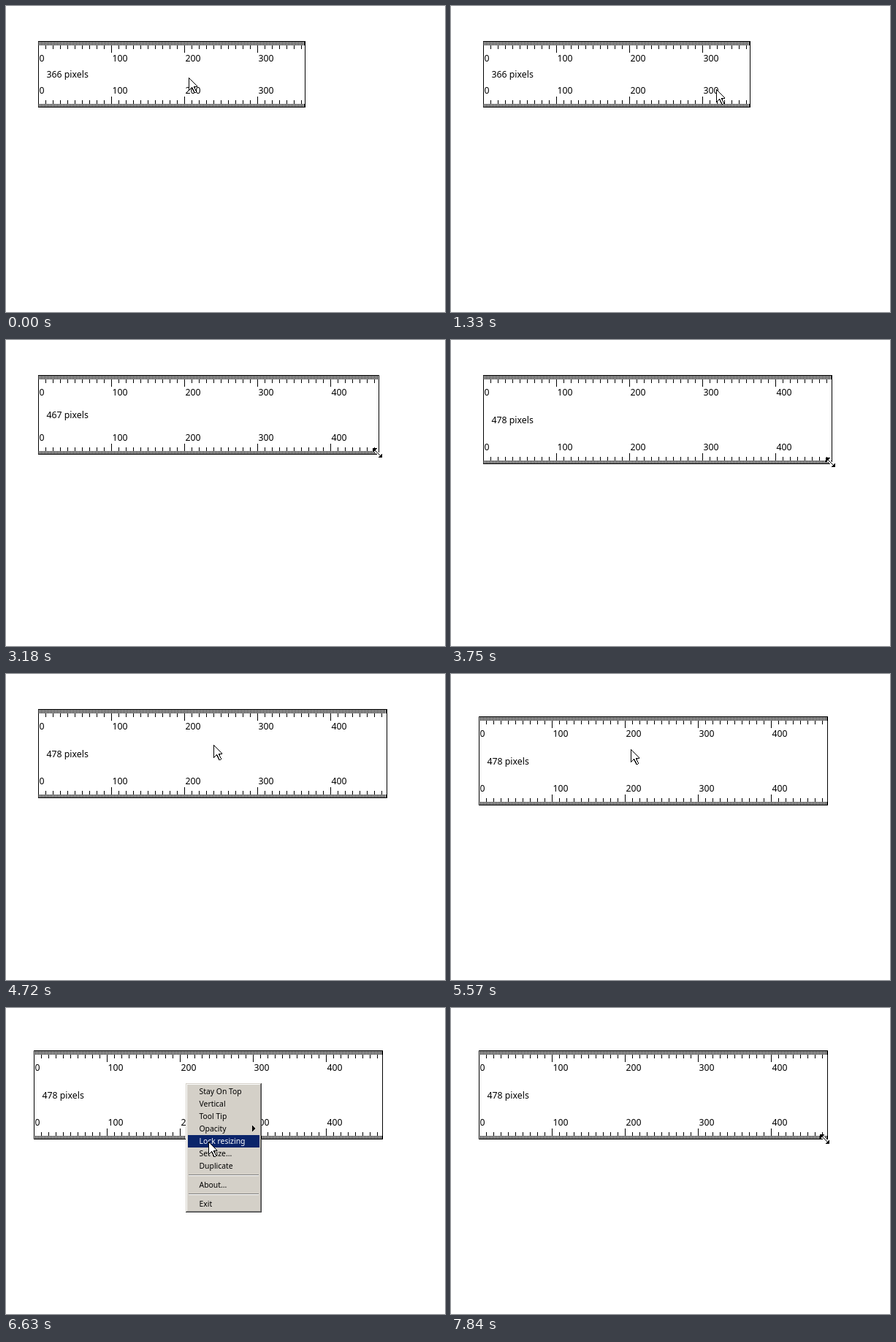
Animation of 601 by 419 pixels, one loop 7.99 s. Source, as an HTML page:

```html
<!DOCTYPE html>
<html lang="en">
<head>
<meta charset="utf-8">
<title>Pixel ruler</title>
<style>
html, body { margin: 0; width: 100%; height: 100%; overflow: hidden; background: #fff; }
#stage { display: block; width: 601px; height: 419px; }
text { font-family: "Noto Sans", "Open Sans", sans-serif; white-space: pre; }
#ruler text { font-size: 12.3px; }
#menu text { font-size: 10.4px; }
path, rect { shape-rendering: crispEdges; }
</style>
</head>
<body>
<svg id="stage" viewBox="0 0 601 419">
  <rect width="601" height="419" fill="#fff"/>
  <svg id="ruler"></svg>
  <g id="menu"></g>
  <g id="cursor">
    <path id="arrow" transform="translate(.5 .5)" fill="#fff" stroke="#000"
      d="M0 0V17L4 13 7.5 20H9L10 18.5 7 12H11V11Z"/>
    <g id="resize">
      <path d="M-4 -4L5 5" stroke="#fff" stroke-width="3"/>
      <path d="M-4 -4L5 5" stroke="#000"/>
      <path d="M-6 -6H0L-6 0ZM7 7V1L1 7Z"/>
    </g>
  </g>
</svg>
<script>
const LOOP = 7990;
const ITEM_H = 17, MENU_X = 246, MENU_Y = 103, MENU_W = 104, MENU_H = 177;
const ITEMS = ["Stay On Top", "Vertical", "Tool Tip", "Opacity", "Lock resizing",
  "Set size...", "Duplicate", "-", "About...", "-", "Exit"];
const $ = id => document.getElementById(id);

// Timeline: every step is a full state that holds until the next one.
const steps = [{ t: 0, x: 250, y: 98, resize: false, rx: 44, ry: 48, w: 366, h: 91, menu: false }];
const last = () => steps[steps.length - 1];
const add = (t, change) => steps.push({ ...last(), t, ...change });

function move(t0, t1, n, x, y, { bend = 0, drag = false, ease = u => u } = {}) {
  const a = last();
  for (let k = 1; k <= n; k++) {
    const u = ease(k / n);
    const dx = Math.round((x - a.x) * u);
    const dy = Math.round((y - a.y) * u + bend * 4 * u * (1 - u));
    add(t0 + (n > 1 ? (t1 - t0) * (k - 1) / (n - 1) : 0), {
      x: a.x + dx, y: a.y + dy, resize: false,
      ...(drag && { rx: a.rx + dx, ry: a.ry + dy })
    });
  }
}

function size(t, w, h) {
  const { rx, ry } = last();
  add(t, { w, h, x: rx + w - 3, y: ry + h - 3, resize: true });
}

const smooth = u => u * u * (3 - 2 * u);

move(150, 460, 3, 235, 85);
move(760, 760, 1, 230, 84);
move(897, 1583, 6, 410, 124, { ease: smooth });
add(1720, { x: 406, y: 132, resize: true });
add(2120, { x: 407, y: 138 });
[[381, 118], [398, 130], [418, 133], [437, 127], [453, 116], [467, 109], [475, 112]]
  .forEach(([w, h], i) => size(2430 + i * 150 + (i > 5 ? 10 : 0), w, h));
size(3490, 478, 118);
size(3626, 478, 122);
move(3762, 3762, 1, 518, 155);
move(3897, 4440, 5, 376, 117);
move(4570, 4720, 2, 284, 97);
move(4990, 5110, 2, 278, 107, { drag: true });
move(5420, 5570, 2, 246, 103);
add(5880, { menu: true });
move(6030, 6630, 5, 277, 183);
add(6940, { menu: false });
move(7090, 7690, 5, 517, 181, { bend: 8, ease: smooth });
add(7840, { x: 511, y: 179, resize: true });

const label = (x, y, s, fill = "#000") => `<text x="${x}" y="${y}" fill="${fill}">${s}</text>`;
const box = (x, y, w, h, fill) => `<rect x="${x}" y="${y}" width="${w}" height="${h}" fill="${fill}"/>`;

function drawRuler({ rx, ry, w, h }) {
  let d = `M.5 .5H${w - .5}V${h - .5}H.5Z`, labels = "";
  for (let i = 0; i < w; i += 2) {
    const len = i % 100 === 0 ? 15 : i % 10 === 0 ? 10 : 5;
    d += `M${i + .5} 0v${len + 1}M${i + .5} ${h}v${-len}`;
    if (len === 15) labels += label(i + 1.5, 28, i) + label(i + 1.5, h - 19, i);
  }
  labels += label(11.5, Math.floor(h / 2) + 5, w + " pixels");
  const el = $("ruler");
  Object.entries({ x: rx, y: ry, width: w, height: h }).forEach(([k, v]) => el.setAttribute(k, v));
  el.innerHTML = box(0, 0, w, h, "#fff") + `<path d="${d}" fill="none" stroke="#000"/>` + labels;
}

function drawMenu({ menu, y: cy }) {
  if (!menu) { $("menu").innerHTML = ""; return; }
  const x = MENU_X, y = MENU_Y, w = MENU_W, h = MENU_H;
  let out = box(x, y, w, h, "#404040") + box(x, y, w - 1, h - 1, "#d4d0c8") +
    box(x + 1, y + 1, w - 2, h - 2, "#808080") + box(x + 1, y + 1, w - 3, h - 3, "#fff") +
    box(x + 2, y + 2, w - 4, h - 4, "#d4d0c8");
  let top = y + 3;
  for (const name of ITEMS) {
    if (name === "-") {
      out += box(x + 4, top + 3, w - 8, 1, "#808080") + box(x + 4, top + 4, w - 8, 1, "#fff");
      top += 9;
      continue;
    }
    const on = cy >= top && cy < top + ITEM_H;
    const ink = on ? "#fff" : "#000";
    if (on) out += box(x + 3, top, w - 6, ITEM_H, "#0a246a");
    out += label(x + 18.5, top + 12, name, ink);
    if (name === "Opacity") out += `<path d="M${x + 91} ${top + 4}v8l4 -4Z" fill="${ink}"/>`;
    top += ITEM_H;
  }
  $("menu").innerHTML = out;
}

function drawCursor({ x, y, resize }) {
  $("cursor").setAttribute("transform", `translate(${x} ${y})`);
  $("arrow").style.display = resize ? "none" : "";
  $("resize").style.display = resize ? "" : "none";
}

let shown = null;
function render(t) {
  let s = steps[0];
  for (const k of steps) if (k.t <= t) s = k;
  if (s === shown) return;
  shown = s;
  drawRuler(s);
  drawMenu(s);
  drawCursor(s);
}

const start = performance.now();
function tick() {
  render((performance.now() - start) % LOOP);
  requestAnimationFrame(tick);
}
tick();
</script>
</body>
</html>
```
